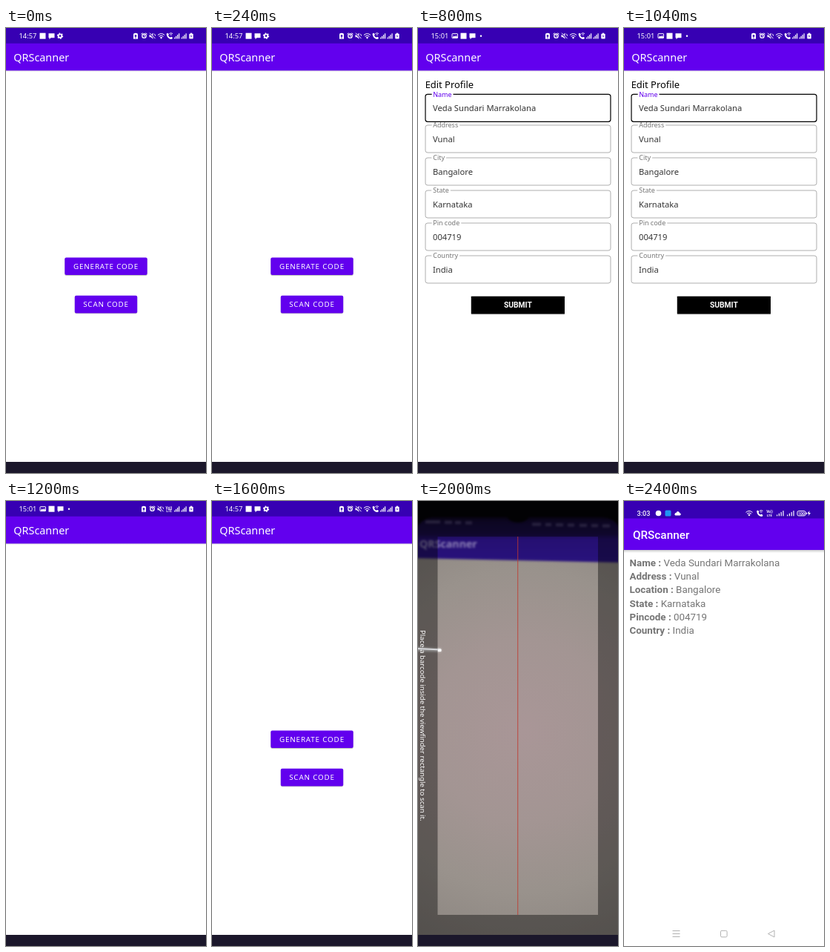
An HTML page for the animation above (2800 ms loop, 270 by 600 pixels).

```html
<!DOCTYPE html>
<html lang="en">
<head>
<meta charset="utf-8">
<title>Scanner app walkthrough</title>
<style>
  html, body { margin: 0; width: 100%; height: 100%; overflow: hidden; background: #fff; }
  svg { display: block; width: 100%; height: 100%; font-family: "Noto Sans", sans-serif; }
  .scene { visibility: hidden; }
  .scene.on { visibility: visible; }
  .roboto { font-family: Roboto, sans-serif; }
  .line { fill: none; stroke: #fff; stroke-width: 1; }
  .notch { stroke: #fff; stroke-width: 5; paint-order: stroke; }
  .blur { filter: blur(1.5px); }
</style>
</head>
<body>
<svg id="stage" viewBox="0 0 270 600" preserveAspectRatio="none">
  <defs>
    <radialGradient id="paper" gradientUnits="userSpaceOnUse" cx="142" cy="310" r="310">
      <stop offset="0" stop-color="#a99697"/>
      <stop offset="0.4" stop-color="#a39593"/>
      <stop offset="0.7" stop-color="#99928c"/>
      <stop offset="1" stop-color="#8b8580"/>
    </radialGradient>
    <linearGradient id="dusk" gradientUnits="userSpaceOnUse" x1="0" y1="18" x2="0" y2="82">
      <stop offset="0" stop-color="#050408"/>
      <stop offset="0.15" stop-color="#140a38"/>
      <stop offset="0.42" stop-color="#190c48"/>
      <stop offset="0.52" stop-color="#250f72"/>
      <stop offset="1" stop-color="#28127c"/>
    </linearGradient>
    <linearGradient id="shadow" x1="0" y1="0" x2="0" y2="1">
      <stop offset="0" stop-color="#000" stop-opacity="0.2"/>
      <stop offset="1" stop-color="#000" stop-opacity="0"/>
    </linearGradient>
  </defs>
</svg>
<script>
const STEP = 400;
const DARK = "#3700b3", PURPLE = "#6200ee", NAV = "#1b172b";
const person = {
  Name: "Veda Sundari Marrakolana", Address: "Vunal", City: "Bangalore",
  State: "Karnataka", "Pin code": "004719", Country: "India"
};

const rect = (x, y, w, h, fill, more = "") =>
  `<rect x="${x}" y="${y}" width="${w}" height="${h}" fill="${fill}" ${more}/>`;
const text = (x, y, size, fill, body, more = "") =>
  `<text x="${x}" y="${y}" font-size="${size}" fill="${fill}" ${more}>${body}</text>`;
const path = (d, more = 'fill="#fff"') => `<path d="${d}" ${more}/>`;
const dot = (r, fill = "#fff", more = "") => `<circle r="${r}" fill="${fill}" ${more}/>`;
const LINE = 'class="line"';
const CENTERED = 'text-anchor="middle" font-weight="700"';

// Status icons are drawn around their own centre.
const bars = step => [0, 1, 2, 3].map(i =>
  rect(-4 + i * step, 2 - i * 1.8, 1.2, 1.8 + i * 1.8, "#fff")).join("");
const icons = {
  square: rect(-4, -4, 8, 8, "#fff"),
  blueSquare: rect(-4, -4, 8, 8, "#2196f3", 'rx="1.5"'),
  circle: dot(3.8),
  point: dot(1.2),
  chat: path("M-4 -3.5 h8 v6 h-5 l-2 2 v-2 h-1z"),
  gear: dot(2.3, "none", 'stroke="#fff" stroke-width="1.9"') +
    dot(3.6, "none", 'stroke="#fff" stroke-width="1.2" stroke-dasharray="1.6 2.17"'),
  picture: rect(-3.5, -3, 7.5, 6, "none", 'stroke="#fff" rx="0.5"') +
    path("M-3 2.5 l2 -3 1.5 1.5 1.5 -2 2 3.5z"),
  cloud: path("M-3 3 q-2 -1 -0.5 -3 q1 -1 1.5 -0.5 q1 -3 3.5 -1.5 q1 0.5 1 1.8 q2 0.2 1.8 1.8 q0 1 -1.3 1.4z"),
  saver: path("M-3 4 v-6 q0 -2 3 -2 q3 0 3 2 v6z") + dot(1.4, DARK) + rect(-1, 2, 2, 0.8, DARK),
  alarm: dot(2.7, "none", 'stroke="#fff" stroke-width="1.3"') +
    path("M0 -1.5 V0.3 H1.3 M-4 -2.5 l2 -1.5 M4 -2.5 l-2 -1.5", LINE),
  mute: path("M-4 -1.5 h2 l3 -2.5 v8 l-3 -2.5 h-2z") +
    path("M-4 -4 L4 4", `stroke="${DARK}" stroke-width="2"`) +
    path("M-3.5 -4 L4 3.5 M2.5 -3 q1.5 1 1.5 3", LINE),
  wifi: path("M-4.5 -1.2 Q0 -5 4.5 -1.2 M-3 0.7 Q0 -1.8 3 0.7", LINE) +
    path("M-1.7 2 q1.7 -1.5 3.4 0 l-1.7 2z"),
  call: path("M-4 -3 l2 -1 1.5 2 -1 1.2 q1 2 2.8 2.8 l1.2 -1 2 1.4 -1 2 q-6.5 0 -7.5 -7.4z") +
    path("M0 -3.2 q2.2 -1.4 4.4 0 M1 -1.4 q1.2 -0.8 2.4 0", LINE),
  volte: text(0, -0.2, 4.6, "#fff", "Vo))", CENTERED) + text(0, 4, 4.4, "#fff", "LTE", CENTERED),
  signal: bars(2),
  wideSignal: bars(2.8),
  battery: rect(-2.7, -3, 5.4, 6.8, "#fff", 'rx="0.7"') + rect(-1.2, -4, 2.4, 1.2, "#fff") +
    path("M0.5 -1.7 l-1.8 2.3 h1.3 l-0.5 2 1.8 -2.5 h-1.3z", `fill="${DARK}"`),
  charge: rect(-6, -3, 11, 6.4, "none", 'stroke="#fff" rx="1.8"') + rect(5.7, -1, 1.2, 2.4, "#fff") +
    text(-0.5, 2.2, 5, "#fff", "100", CENTERED) +
    path("M10.5 -3.5 l-3 4 h2 l-0.5 3 3 -4 h-2z")
};
const place = (list, y) => list.map(([name, x]) =>
  `<g transform="translate(${x} ${y})">${icons[name]}</g>`).join("");

const homeTray = [["square", 49.5], ["chat", 61.5], ["gear", 73]];
const formTray = [["picture", 49.5], ["square", 61.5], ["chat", 73.5], ["point", 85]];
const radio = [["signal", 231], ["signal", 240.5], ["battery", 250]];
const wifiTray = [["saver", 175], ["alarm", 186.5], ["mute", 197.5], ["wifi", 209.5], ["call", 220.5], ...radio];
const volteTray = [["saver", 186], ["alarm", 197.5], ["mute", 208.5], ["volte", 220], ...radio];
const resultTray = [["circle", 46.5], ["blueSquare", 59.5], ["cloud", 72.5], ["wifi", 169], ["call", 183],
  ["volte", 196.5], ["wideSignal", 210], ["wideSignal", 224], ["charge", 240]];

const chrome = (clock, left, right) =>
  rect(0, 0, 270, 600, "#fff") + rect(0, 57, 270, 2, "url(#shadow)") +
  rect(0, 0, 270, 57.4, PURPLE) + rect(0, 0, 270, 20.75, DARK) +
  rect(0, 585, 270, 15, NAV) +
  text(17.5, 14.3, 9.3, "#fff", clock) + place([...left, ...right], 10.7) +
  text(10.3, 45, 14.4, "#fff", "QRScanner");

const button = (x, y, w, label, size, fill, radius, more) =>
  rect(x, y + 0.8, w, 23.7, "#000", `rx="${radius}" opacity="0.25"`) +
  rect(x, y, w, 23.7, fill, `rx="${radius}"`) +
  text(x + w / 2, y + 15.6, size, "#fff", label, `text-anchor="middle" ${more}`);

function home() {
  const caps = 'font-weight="500" letter-spacing="0.85"';
  return chrome("14:57", homeTray, wifiTray) +
    button(79.3, 309.4, 111.4, "GENERATE CODE", 9.8, PURPLE, 2, caps) +
    button(92.8, 360.7, 84.4, "SCAN CODE", 9.8, PURPLE, 2, caps);
}

function field(label, value, index, filled) {
  const y = index ? 87 + index * 44 : 89.3;
  const focused = filled && !index;
  const box = rect(10, y, 250, 37, "none",
    `rx="3" stroke="${focused ? "#000" : "#9b9b9b"}" stroke-width="${focused ? 1.2 : 0.8}"`);
  if (!filled) return box + text(20, y + 22.5, 11.2, "#707070", label);
  return box + text(20.2, y + 3.2, 9, focused ? PURPLE : "#757575", label, 'class="notch"') +
    text(20, y + 22.7, 11.2, "#333", value);
}

function form(clock, filled) {
  // Lower fields go first so that a label never covers the box above it.
  const fields = Object.entries(person).map(([label, value], i) => field(label, value, i, filled)).reverse();
  return chrome(clock, formTray, wifiTray) +
    text(9.7, 81, 12.9, "#000", "Edit Profile", 'font-weight="500"') + fields.join("") +
    button(71.8, 361.8, 126.2, "SUBMIT", 10.3, "#000", 0.5, 'class="roboto" font-weight="700"');
}

function camera() {
  const mask = "M0 0H270V585H0Z M26.5 48V558H243V48Z";
  const blurredTray = [[10, 20], [36, 10], [50, 8], [64, 9], [154, 12], [172, 8], [186, 10],
    [202, 9], [218, 10], [234, 9], [249, 10]];
  return rect(0, 0, 270, 585, "url(#paper)") +
    path("M-5 -5 H275 V83 L-5 77Z", 'fill="url(#dusk)" class="blur"') +
    path("M-5 -5 H275 V42 Q268 24 250 21 H150 Q146 29 135 29 Q124 29 120 21 H20 Q5 23 -5 40Z",
      'fill="#040306" class="blur"') +
    text(2, 63, 14.2, "#b0a8cc", "QRScanner", 'class="blur" font-weight="700" opacity="0.75"') +
    blurredTray.map(([x, w]) =>
      rect(x, 26 + x / 45, w, 4, "#8a80ac", 'class="blur" opacity="0.4"')).join("") +
    path("M-3 197 L31 199.5 V203 L-3 202Z", 'fill="#fff" class="blur"') +
    path(mask, 'fill="#000" fill-opacity="0.4" fill-rule="evenodd"') +
    path("M0 199 L31 200.5", 'stroke="#d5d5d8" stroke-width="2"') +
    rect(27, 199.5, 4.5, 3.5, "#fff", 'rx="1"') +
    rect(134, 48, 1.3, 510, "#c0392f", 'opacity="0.65"') +
    text(0, 0, 9.6, "#fff", "Place a barcode inside the viewfinder rectangle to scan it.",
      'transform="translate(2.5 174) rotate(90)"') +
    rect(0, 585, 270, 15, NAV);
}

function result() {
  const names = { City: "Location", "Pin code": "Pincode" };
  const rows = Object.entries(person).map(([label, value], i) =>
    text(7.5, 88 + i * 18.2, 13.4, "#757575",
      `<tspan font-weight="700">${names[label] || label} :</tspan> ${value}`)).join("");
  return `<g class="roboto">` + rect(0, 0, 270, 600, "#fff") +
    rect(0, 66, 270, 4, "url(#shadow)") + rect(0, 0, 270, 66, PURPLE) + rect(0, 0, 270, 23.5, DARK) +
    text(17.5, 19.8, 9.1, "#fff", "3:03", 'font-weight="500"') + place(resultTray, 16.5) +
    text(12, 51, 15.3, "#fff", "QRScanner", 'font-weight="500"') + rows +
    path("M65.5 579.5 h10 m-10 4 h10 m-10 4 h10 M203 579 v9 l-8.5 -4.5z",
      'fill="none" stroke="#aaa" stroke-width="0.9"') +
    rect(130.5, 579.3, 8.6, 8.6, "none", 'rx="1.5" stroke="#aaa" stroke-width="0.9"') + `</g>`;
}

const scenes = [home(), form("14:58", false), form("15:01", true),
  chrome("15:01", formTray, volteTray), camera(), result()];
const order = [0, 1, 2, 3, 0, 4, 5];

const stage = document.getElementById("stage");
stage.insertAdjacentHTML("beforeend", scenes.map(s => `<g class="scene">${s}</g>`).join(""));
const groups = [...stage.querySelectorAll(".scene")];

const start = performance.now();
function draw() {
  const step = Math.floor((performance.now() - start) / STEP) % order.length;
  groups.forEach((g, i) => g.classList.toggle("on", i === order[step]));
  requestAnimationFrame(draw);
}
draw();
</script>
</body>
</html>
```
